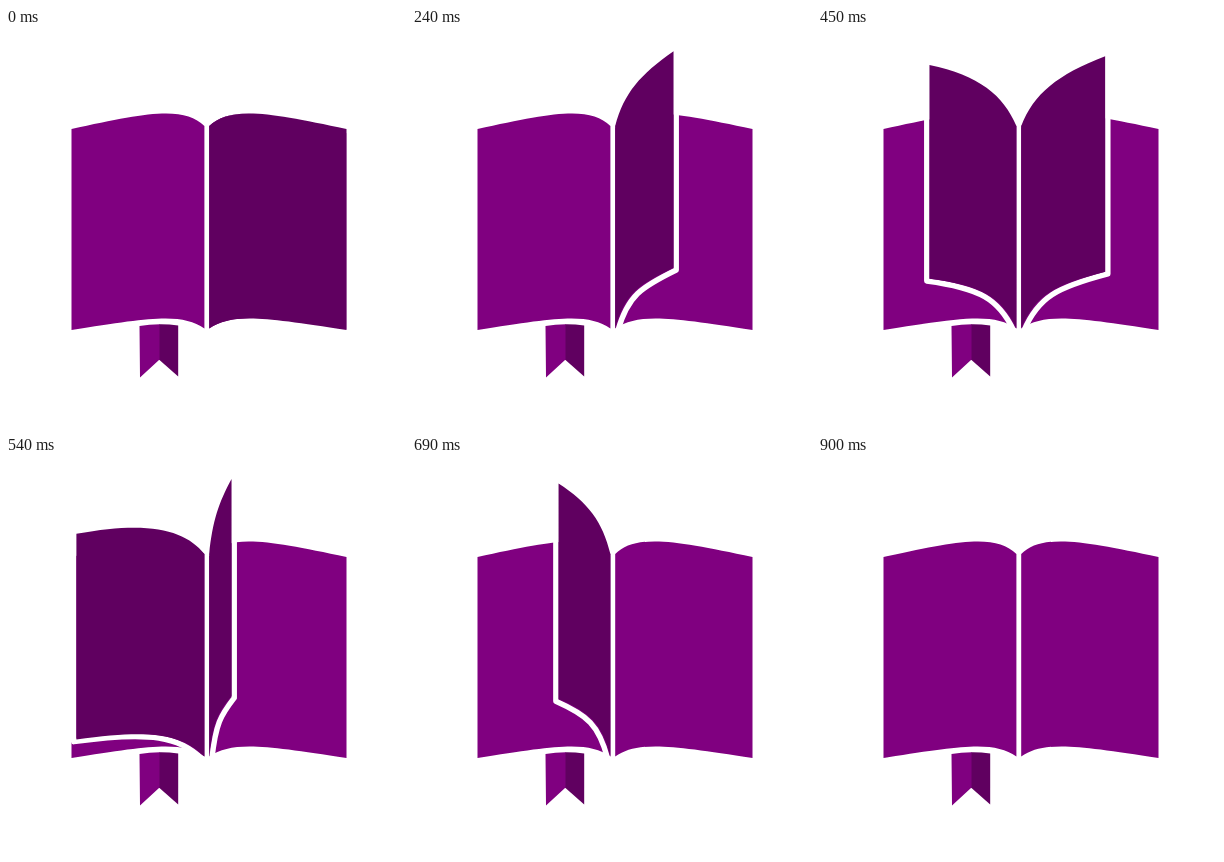
Write an HTML page that moves like this. It is 400 by 400 pixels and loops after 2.93 s.

```html
<!DOCTYPE html>
<html lang="en">
<head>
<meta charset="utf-8">
<title>Book with turning pages</title>
<style>
  html, body { margin: 0; width: 100%; height: 100%; overflow: hidden; background: #fff; }
  svg { display: block; width: 100%; height: 100%; }
  .cover { fill: #800080; }
  .leaf { fill: #600060; }
  .gap { fill: none; stroke: #fff; stroke-width: 5.4; stroke-linejoin: round; }
</style>
</head>
<body>
<svg viewBox="0 0 400 400">
  <path class="cover" id="left"/>
  <path class="cover" id="right"/>
  <g id="second"><path class="gap"/><path class="leaf"/></g>
  <g id="first"><path class="gap"/><path class="leaf"/></g>
  <path class="cover" d="M133.5 298 Q143 296.5 154 296.3 V332 L153 332 L134 349.5Z"/>
  <path class="leaf" d="M153.5 296.3 Q163 296.2 172.2 297.5 V348.5 L153.5 332Z"/>
</svg>
<script>
const LOOP = 2930, STEP = 30;
const byId = id => document.getElementById(id);

const right = { sign: 1, spine: 203.2, width: 137.3 };
const left = { sign: -1, spine: 198.4, width: 132.9 };

// Turning speed, as [time in ms, angle in degrees].
const leaves = [
  { node: byId("first"), turn: [[0, 0], [330, 90.6], [610, 180]] },
  { node: byId("second"), turn: [[270, 0], [540, 81], [690, 112], [900, 180]] }
];

function angleAt(turn, t) {
  const next = turn.findIndex(([time]) => time > t);
  if (next < 1) return null;
  const [t0, a0] = turn[next - 1], [t1, a1] = turn[next];
  return (a0 + (a1 - a0) * (t - t0) / (t1 - t0)) * Math.PI / 180;
}

// A page bows upwards near the spine; lifting its outer edge straightens the bow.
function outline({ sign, spine }, width, lift) {
  const point = (across, y) => `${spine + sign * width * across} ${y}`;
  const bow = lift - lift * lift / 150;
  return `M${point(0, 300.5)}` +
    `C${point(0.17, 285 - 0.25 * lift)} ${point(0.39, 289 - 0.85 * bow)} ${point(1, 302 - 0.8 * lift)}` +
    `L${point(1, 101 - lift)}` +
    `C${point(0.43, 84 - bow)} ${point(0.15, 78 - 0.17 * lift)} ${point(0, 98)}`;
}

function drawLeaf({ node, turn }, t) {
  const angle = angleAt(turn, t);
  node.style.display = angle === null ? "none" : "";
  if (angle === null) return;

  const cos = Math.cos(angle), sin = Math.sin(angle);
  const side = cos > 0 ? right : left;
  // The raised page reaches past the flat one until it meets the cover's edge.
  const width = Math.min(side.width, (side.width + 5.5) * Math.abs(cos));
  const lift = sin * sin * (3 - 2 * sin) * (77 + 6 * cos);

  const path = outline(side, width, lift);
  const [gap, leaf] = node.children;
  gap.setAttribute("d", path);
  gap.setAttribute("transform", `translate(${side.sign * 2.7} 2.2)`);
  leaf.setAttribute("d", path + "Z");
}

function render(elapsed) {
  const t = Math.floor((elapsed % LOOP) / STEP) * STEP;
  leaves.forEach(leaf => drawLeaf(leaf, t));
}

byId("left").setAttribute("d", outline(left, left.width, 0) + "Z");
byId("right").setAttribute("d", outline(right, right.width, 0) + "Z");

let start;
function tick(now) {
  start ??= now;
  render(now - start);
  requestAnimationFrame(tick);
}
render(0);
requestAnimationFrame(tick);
</script>
</body>
</html>
```
